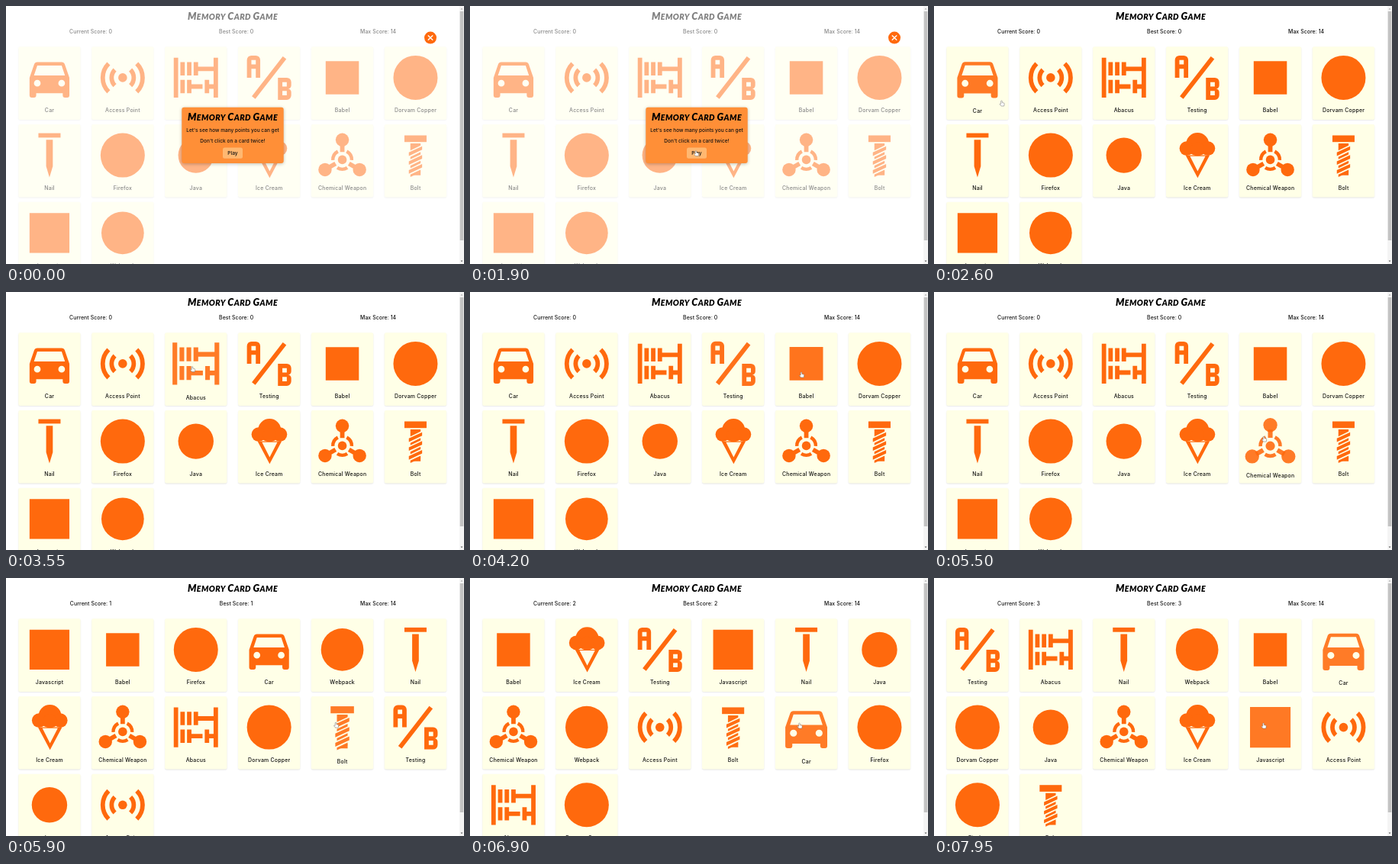
An HTML page with a canvas that plays this animation: 600x338 px, repeating every 8 s.

```html
<!DOCTYPE html>
<html lang="en">
<head>
<meta charset="utf-8">
<title>Memory Card Game</title>
<style>
  html, body { margin: 0; width: 100%; height: 100%; overflow: hidden; background: #fff; }
  canvas { display: block; width: 600px; height: 338px; }
</style>
</head>
<body>
<canvas id="stage"></canvas>
<script>
const W = 600, H = 338, LOOP = 8000, STEP = 50;
const ORANGE = "#ff690d", CARD = "#ffffe7";
const COL = 95.9, ROW = 101.7, CARD_W = 81.3, CARD_H = 95.6, LEFT = 16.3, TOP = 53.3;
const UNIT = 2.9; // icons are drawn on a grid of 24 units
const PLAY_AT = 1950, HOVER_MS = 300, TICK = 10;

const canvas = document.getElementById("stage");
const ctx = canvas.getContext("2d");
const dpr = window.devicePixelRatio || 1;
canvas.width = W * dpr;
canvas.height = H * dpr;

// Order of the cards after each click.
const deals = [
  [0, "Car,Access Point,Abacus,Testing,Babel,Dorvam Copper,Nail,Firefox,Java,Ice Cream,Chemical Weapon,Bolt,Javascript,Webpack"],
  [5550, "Javascript,Babel,Firefox,Car,Webpack,Nail,Ice Cream,Chemical Weapon,Abacus,Dorvam Copper,Bolt,Testing,Java,Access Point"],
  [6650, "Babel,Ice Cream,Testing,Javascript,Nail,Java,Chemical Weapon,Webpack,Access Point,Bolt,Car,Firefox,Abacus,Dorvam Copper"],
  [7850, "Testing,Abacus,Nail,Webpack,Babel,Car,Dorvam Copper,Java,Chemical Weapon,Ice Cream,Javascript,Access Point,Firefox,Bolt"]
].map(([at, names]) => ({ at, names: names.split(",") }));

// Pointer stops: time, x, y.
const stops = [
  [0, 425, 234], [850, 345, 222], [1800, 296, 189], [2200, 296, 189],
  [2470, 100, 134], [2600, 88.5, 123.5], [2750, 87.5, 122], [2950, 87.5, 122],
  [3300, 236, 101], [3550, 244, 97], [3800, 246, 97], [4400, 528, 108],
  [4700, 537, 118], [4850, 534, 150], [4900, 533, 166], [5150, 505, 190],
  [5450, 432, 188.5], [6450, 432, 188.5], [6500, 431.5, 189.5], [LOOP, 431.5, 189.5]
];

const clamp = v => Math.max(0, Math.min(1, v));
const smooth = v => v * v * (3 - 2 * v);

function pointer(t) {
  const i = Math.max(1, stops.findIndex(s => s[0] >= t));
  const [t0, x0, y0] = stops[i - 1], [t1, x1, y1] = stops[i];
  const p = (t - t0) / (t1 - t0);
  return { x: x0 + (x1 - x0) * p, y: y0 + (y1 - y0) * p };
}

const dealIndex = t => deals.filter(d => t >= d.at).length - 1;

function cardAt({ x, y }) {
  const c = Math.floor((x - LEFT) / COL), r = Math.floor((y - TOP) / ROW);
  const inside = x - LEFT - c * COL < CARD_W && y - TOP - r * ROW < CARD_H;
  return inside && c >= 0 && c < 6 && r >= 0 ? r * 6 + c : -1;
}

function hoveredName(t) {
  return t < PLAY_AT ? undefined : deals[dealIndex(t)].names[cardAt(pointer(t))];
}

// Hover level of every card, worked out once along the time line.
const levels = [];
const now = Object.fromEntries(deals[0].names.map(n => [n, 0]));
for (let t = 0; t <= LOOP; t += TICK) {
  const hot = hoveredName(t);
  for (const n in now) now[n] = clamp(now[n] + (n === hot ? 1 : -1) * TICK / HOVER_MS);
  levels.push({ ...now });
}

function disc(x, y, r) {
  ctx.beginPath();
  ctx.arc(x, y, r, 0, 7);
  ctx.fill();
}
function poly(...p) {
  ctx.beginPath();
  for (let i = 0; i < p.length; i += 2) ctx.lineTo(p[i], p[i + 1]);
  ctx.closePath();
  ctx.fill();
}
function arc(x, y, r, mid, half, width) {
  ctx.lineWidth = width;
  ctx.beginPath();
  ctx.arc(x, y, r, mid - half, mid + half);
  ctx.stroke();
}
function line(x0, y0, x1, y1, width) {
  ctx.lineWidth = width;
  ctx.beginPath();
  ctx.moveTo(x0, y0);
  ctx.lineTo(x1, y1);
  ctx.stroke();
}
function box(x, y, w, h, r = 0) {
  ctx.beginPath();
  ctx.roundRect(x, y, w, h, r);
  ctx.fill();
}
const square = s => box(12 - s / 2, 12 - s / 2, s, s);

const carPath = new Path2D(
  "M18.92 6C18.72 5.42 18.16 5 17.5 5H6.5C5.84 5 5.29 5.42 5.08 6L3 12V20A1 1 0 0 0 4 21H5A1 1 0 0 0 6 20V19H18V20A1 1 0 0 0 19 21H20A1 1 0 0 0 21 20V12Z" +
  "M5 11L6.5 6.5H17.5L19 11Z" +
  "M5 14.5a1.5 1.5 0 1 0 3 0a1.5 1.5 0 1 0-3 0ZM16 14.5a1.5 1.5 0 1 0 3 0a1.5 1.5 0 1 0-3 0Z");
const abacusPath = new Path2D(
  "M2 3H4V21H2ZM5 5H7V11H5ZM8 5H10V11H8ZM5 13H7V19H5Z" +
  "M8 13H10V15H15V17H10V19H8Z" +
  "M20 3H22V21H20V17H18V19H16V13H18V15H20V9H13V11H11V5H13V7H20Z");
const lettersPath = new Path2D(
  "M4 2A2 2 0 0 0 2 4V12H4V8H6V12H8V4A2 2 0 0 0 6 2ZM4 4H6V6H4Z" +
  "M22 15.5V14A2 2 0 0 0 20 12H16V22H20A2 2 0 0 0 22 20V18.5A1.5 1.5 0 0 0 20.5 17A1.5 1.5 0 0 0 22 15.5ZM18 18H20V20H18ZM18 14H20V16H18Z" +
  "M5.79 21.61L4.21 20.39L18.21 2.39L19.79 3.61Z");
const conePath = new Path2D("M6.8 12H17.7L12.25 22.2ZM8.8 12.4L12.25 19.2L15.75 12.4Z");

const icons = {
  "Car"() { ctx.fill(carPath, "evenodd"); },
  "Access Point"() {
    disc(12, 12, 2);
    for (const a of [0, Math.PI])
      for (const r of [5, 9]) arc(12, 12, r, a, Math.PI / 4, 2);
  },
  "Abacus"() { ctx.fill(abacusPath); },
  "Testing"() { ctx.fill(lettersPath, "evenodd"); },
  "Babel"() { square(15); },
  "Dorvam Copper"() { disc(12, 12, 10); },
  "Nail"() {
    box(7, 2, 10, 2);
    poly(10.5, 5, 13.5, 5, 13.5, 17, 12, 22, 10.5, 17);
  },
  "Firefox"() { disc(12, 12, 10); },
  "Java"() { disc(12, 12, 8); },
  "Ice Cream"() {
    disc(12.2, 7, 5.2);
    disc(7.3, 8.9, 3.25);
    disc(16.9, 8.9, 3.25);
    disc(12.2, 9, 3);
    ctx.fill(conePath, "evenodd");
  },
  "Chemical Weapon"() {
    disc(12, 14, 2);
    for (let i = 0; i < 3; i++) {
      const a = -Math.PI / 2 + i * Math.PI * 2 / 3, c = Math.cos(a), s = Math.sin(a);
      disc(12 + c * 9, 14 + s * 9, 3);
      line(12 + c * 3.5, 14 + s * 3.5, 12 + c * 7, 14 + s * 7, 2);
      arc(12, 14, 4.25, a + Math.PI / 3, .56, 1.5);
    }
  },
  "Bolt"() {
    box(7, 3, 10, 3);
    poly(9.7, 6.6, 14.3, 6.6, 14.3, 7.6, 9.7, 9.8);
    for (let y = 7.9; y < 17; y += 4) {
      poly(15, y, 15, y + 1.6, 9, y + 4.4, 9, y + 2.8);
      poly(14.3, y + 2.6, 14.3, y + 3.7, 9.7, y + 5.9, 9.7, y + 4.8);
    }
    poly(14.3, 19.3, 14.3, 21, 10.8, 21);
  },
  "Javascript"() { square(18); },
  "Webpack"() { disc(12, 12, 9.6); }
};

function label(text, x, y, size, spacing) {
  ctx.font = `500 ${size}px Inter, "Open Sans", sans-serif`;
  ctx.letterSpacing = spacing + "px";
  ctx.textAlign = "center";
  ctx.fillStyle = "#111";
  ctx.fillText(text, x, y);
}

// Marker-like capitals with taller initials.
function heading(x, y) {
  const parts = [["M", 1], ["EMORY ", 0], ["C", 1], ["ARD ", 0], ["G", 1], ["AME", 0]];
  const setFont = big => ctx.font = `italic 900 ${big ? 12.8 : 10.6}px Lato, "Open Sans", sans-serif`;
  ctx.letterSpacing = "0.4px";
  ctx.textAlign = "left";
  let width = 0;
  for (const [s, big] of parts) { setFont(big); width += ctx.measureText(s).width; }
  x -= width / 2;
  ctx.fillStyle = "#000";
  for (const [s, big] of parts) {
    setFont(big);
    ctx.fillText(s, x, y);
    x += ctx.measureText(s).width;
  }
}

function shadow(color, blur, dy) {
  ctx.shadowColor = color;
  ctx.shadowBlur = blur * dpr;
  ctx.shadowOffsetY = dy * dpr;
}

function drawCard(name, i, level) {
  const x = LEFT + i % 6 * COL, y = TOP + Math.floor(i / 6) * ROW;
  const grow = smooth(level), size = UNIT * (1 + .055 * grow);
  ctx.save();
  shadow("rgba(0,0,0,.1)", 1.5, .9);
  ctx.fillStyle = CARD;
  box(x, y, CARD_W, CARD_H, 2);
  ctx.restore();

  ctx.save();
  ctx.translate(x + CARD_W / 2, y + 40.6);
  ctx.scale(size, size);
  ctx.translate(-12, -12);
  ctx.globalAlpha = 1 - .12 * clamp(level * 2.5);
  ctx.fillStyle = ctx.strokeStyle = ORANGE;
  icons[name]();
  ctx.restore();
  label(name, x + CARD_W / 2 + .1, y + 85.9 + 1.7 * grow, 6.9, .24);
}

function drawModal() {
  ctx.fillStyle = "rgba(255,255,255,.5)";
  ctx.fillRect(0, 0, 594, H);
  ctx.save();
  shadow("rgba(0,0,0,.25)", 4, 1);
  ctx.fillStyle = "#ff8f37";
  box(230.3, 132.8, 133.4, 73.2, 3);
  ctx.restore();
  heading(297, 150.3);
  label("Let's see how many points you can get", 297, 164.6, 6.5, .02);
  label("Don't click on a card twice!", 297, 178.6, 6.5, .04);
  ctx.fillStyle = "#ffb871";
  box(284, 185.5, 26, 14.3, 2.5);
  label("Play", 297, 195, 6.6, 0);
  ctx.fillStyle = ORANGE;
  disc(556, 41.6, 8);
  ctx.strokeStyle = "#fff";
  line(552.8, 38.4, 559.2, 44.8, 1.4);
  line(559.2, 38.4, 552.8, 44.8, 1.4);
}

function drawScrollbar() {
  ctx.fillStyle = "#f4f4f4";
  ctx.fillRect(594, 0, 6, H);
  ctx.fillStyle = "#c3c3c3";
  ctx.fillRect(594.7, 7, 4.7, 300);
  ctx.fillStyle = "#a3a3a3";
  poly(595.6, 4.4, 598.4, 4.4, 597, 2.8);
  ctx.fillStyle = "#505050";
  poly(595.6, 333.6, 598.4, 333.6, 597, 335.2);
}

const hand = new Path2D("M-1 4.5V.7Q0-.6 1 .7V3.2L4 3.9Q4.7 4.1 4.5 5L4 8.6H-.5L-3 5.7Q-3 4.4-1 5.3Z");
const arrow = new Path2D("M0 0V8L1.9 6.3 3.2 9 4.4 8.4 3.1 5.9H5.6Z");

function drawPointer(t) {
  const p = pointer(t);
  const onPlay = t < PLAY_AT && p.x > 284 && p.x < 310 && p.y > 185 && p.y < 200;
  const shape = onPlay || hoveredName(t) ? hand : arrow;
  ctx.save();
  ctx.translate(p.x, p.y + .5);
  ctx.scale(.82, .82);
  ctx.fillStyle = "#fff";
  ctx.strokeStyle = "#666";
  ctx.lineWidth = .6;
  ctx.fill(shape);
  ctx.stroke(shape);
  ctx.restore();
}

function draw(t) {
  const score = dealIndex(t);
  ctx.setTransform(dpr, 0, 0, dpr, 0, 0);
  ctx.fillStyle = "#fff";
  ctx.fillRect(0, 0, W, H);
  heading(297, 18.2);
  label("Current Score: " + score, 111, 36, 6.9, .1);
  label("Best Score: " + score, 301.7, 36, 6.9, .1);
  label("Max Score: 14", 487.6, 36, 6.9, .06);
  deals[score].names.forEach((n, i) => drawCard(n, i, levels[t / TICK][n]));
  if (t < PLAY_AT) drawModal();
  drawScrollbar();
  if (t >= STEP) drawPointer(t);
}

const start = performance.now();
function frame() {
  const t = (performance.now() - start) % LOOP;
  draw(Math.floor(t / STEP) * STEP);
  requestAnimationFrame(frame);
}
frame();
</script>
</body>
</html>
```
